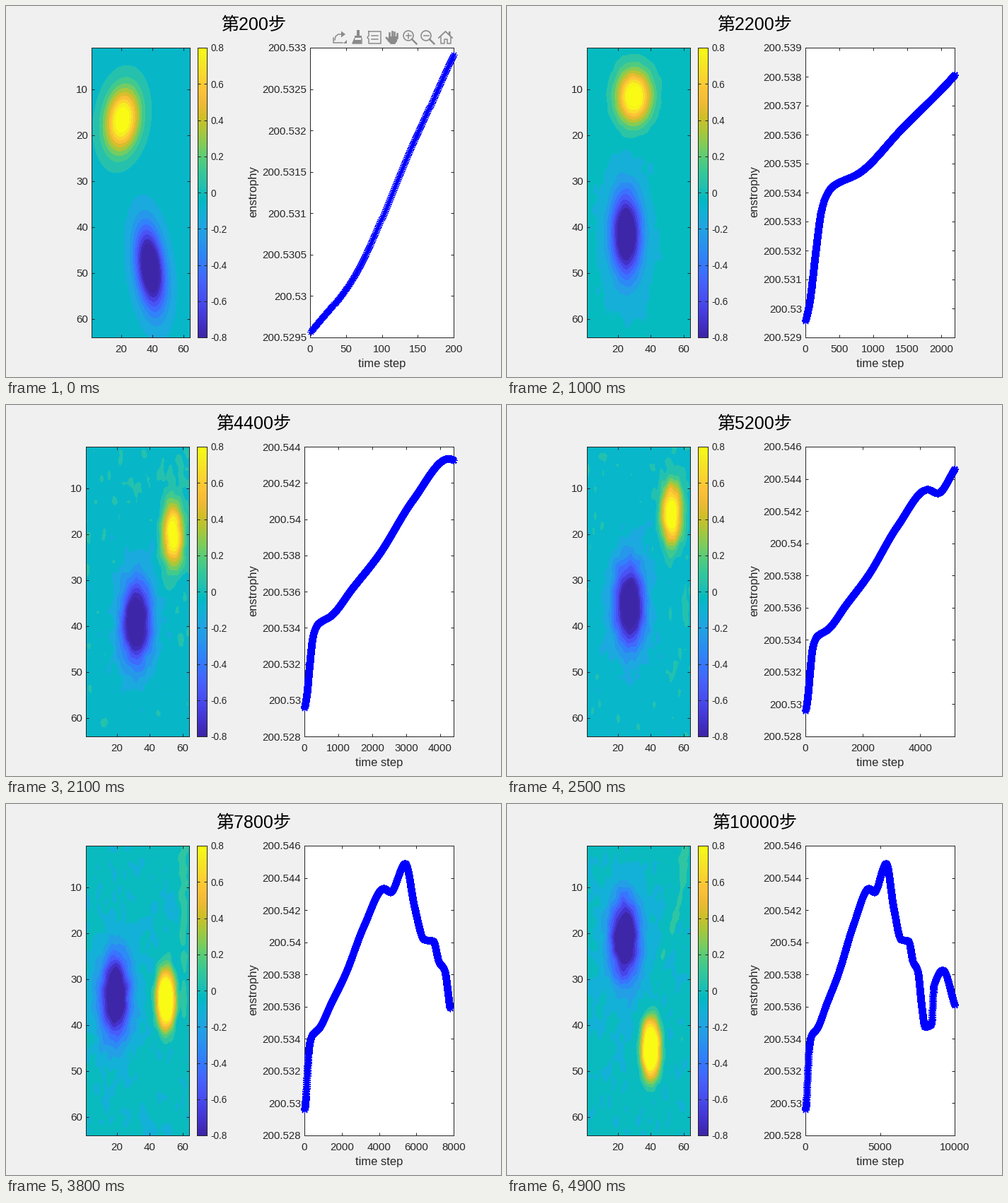
A matplotlib script that plays this animation: 700x525 px, repeating every 5000 ms.

```python
import numpy as np
import matplotlib.pyplot as plt
from matplotlib.animation import FuncAnimation
from matplotlib.colors import LinearSegmentedColormap, Normalize
from matplotlib.patches import Circle, Polygon

W, H, DPI = 700, 525, 100
FRAMES, INTERVAL, STRIDE = 50, 100, 200
PT = 72 / DPI
INK, ICON = "#262626", "#8a8a8a"
TOP, BOTTOM, RIGHT = 59, 469, 633

plt.rcParams["font.family"] = ["Liberation Sans", "Noto Sans CJK JP"]
plt.rcParams["axes.linewidth"] = PT

PARULA = LinearSegmentedColormap.from_list("warm_teal", [
    "#3e26a8", "#4332cb", "#4741e5", "#4852f4", "#4563fd", "#3875fe",
    "#2e87f7", "#2797eb", "#20a5e3", "#12b1d6", "#02bac3", "#24c1ae",
    "#37c897", "#57cc7a", "#81cc59", "#abc739", "#d1bf27", "#f0ba36",
    "#fec338", "#fad62d", "#f5e924", "#f9fb15"])
NORM = Normalize(-0.8, 0.8)

# Key points of the vortex paths, in pixels inside the field panel
PATH_STEPS = [200, 2200, 4400, 6200, 7800, 8600, 10000]
POSITIVE_PATH = [46 + 102j, 67 + 69j, 124 + 125j, 115 + 52j, 114 + 217j, 110 + 249j, 91 + 287j]
NEGATIVE_PATH = [88 + 312j, 56 + 264j, 72 + 248j, 44 + 199j, 42 + 213j, 36 + 142j, 54 + 132j]

# Turning points of the curve: step and (enstrophy - 200) * 1e5
ENSTROPHY = [
    (0, 52956), (60, 53022), (150, 53197), (230, 53335), (300, 53388),
    (400, 53422), (800, 53470), (1400, 53616), (2200, 53807), (3200, 54108),
    (4250, 54335), (4600, 54312), (5400, 54490), (5900, 54215), (6400, 54018),
    (6900, 54008), (7200, 53880), (7500, 53828), (7800, 53590), (8000, 53475),
    (8430, 53490), (8600, 53732), (9200, 53828), (10000, 53609)]

X, Y = np.meshgrid(np.linspace(0, 147, 64), np.linspace(0, 410, 64))
GRID = np.arange(1, 65)


def ease(t, start, end):
    u = np.clip((t - start) / (end - start), 0, 1)
    return u * u * (3 - 2 * u)


def glide(knots, values, t):
    """Smooth monotone interpolation through key points."""
    knots, values = np.asarray(knots, float), np.asarray(values, float)
    secant = np.diff(values) / np.diff(knots)
    a, b = secant[:-1], secant[1:]
    rising = a * b > 0
    inner = np.where(rising, 2 * a * b / np.where(rising, a + b, 1), 0)
    slope = np.concatenate([secant[:1], inner, secant[-1:]])
    i = np.clip(np.searchsorted(knots, t, "right") - 1, 0, len(knots) - 2)
    span = knots[i + 1] - knots[i]
    u = (t - knots[i]) / span
    return (values[i] + (values[i + 1] - values[i]) * u * u * (3 - 2 * u)
            + span * u * (1 - u) * (slope[i] * (1 - u) - slope[i + 1] * u))


def ripple_field(rng):
    z = rng.normal(size=(64, 64))
    for axis in (0, 1, 1):
        z = (np.roll(z, 1, axis) + 2 * z + np.roll(z, -1, axis)) / 4
    return z / z.std()


RNG = np.random.default_rng(7)
RIPPLES = [ripple_field(RNG) for _ in range(2)]


def radius(path, step, width, height, shear):
    cx = glide(PATH_STEPS, np.real(path), step)
    cy = glide(PATH_STEPS, np.imag(path), step)
    dy = Y - cy
    return np.hypot((X - cx - shear * dy) / width, dy / height)


def positive(step):
    """Shrinks, then steepens; squeezed flat near the top wall."""
    late = ease(step, 4000, 7000)
    cy = glide(PATH_STEPS, np.imag(POSITIVE_PATH), step)
    r = radius(POSITIVE_PATH, step, 24 - 10 * ease(step, 2200, 4400),
               44 - 11 * np.exp(-(cy / 85) ** 4), -0.12 * np.exp(-step / 800))
    return (1 + 0.1 * late) * np.exp(-r ** (2 + late))


def negative(step):
    r = radius(NEGATIVE_PATH, step, 21, 57, 0.14 * np.exp(-step / 800))
    return 1.05 * np.exp(-r**2) + 0.06 * np.exp(-(r / 2) ** 2)


def wall_trail(step):
    path = 139 - 70 * ease(step, 8600, 10000) * (Y / 240) ** 2
    length = 380 - 180 * ease(step, 6200, 8600)
    strength = 0.11 * ease(step, 4800, 6200)
    return strength * np.exp(-((X - path) / 5) ** 2 - (Y / length) ** 6)


def ripples(step):
    phase = step / 450
    mix = np.cos(phase) * RIPPLES[0] + np.sin(phase) * RIPPLES[1]
    return 0.026 * ease(step, 1000, 4000) * mix


def base_level(step):
    bump = np.exp(-((step - 2200) / 1200) ** 2)
    return -0.063 + 0.033 * bump + 0.04 * ease(step, 6400, 7400)


def nice_step(fits):
    return next(m * 10**e for e in range(6) for m in (1, 2, 5) if fits(m * 10**e))


def x_axis(step, width):
    limit = step if step < 7000 else 8000 if step <= 8000 else 10000
    gap = len(str(limit)) * 8.2 * 1.25
    return limit, nice_step(lambda s: s * width / limit >= gap)


def y_axis(low, high):
    def bounds(s):
        return np.floor(low / s) * s, np.ceil(high / s) * s

    s = nice_step(lambda s: (bounds(s)[1] - bounds(s)[0]) / s <= 10)
    return (*bounds(s), s)


fig = plt.figure(figsize=(W / DPI, H / DPI), dpi=DPI, facecolor="#f0f0f0")


def framed_axes(size):
    ax = fig.add_axes([0, 0, 1, 1], label=f"panel{len(fig.axes)}")
    ax.tick_params(direction="in", length=4 * PT, width=PT, color=INK,
                   labelcolor=INK, labelsize=size * PT, top=True, right=True)
    ax.tick_params(axis="x", pad=10 * PT)
    ax.tick_params(axis="y", pad=5 * PT)
    ax.spines[:].set_color(INK)
    return ax


def place(ax, left, right):
    ax.set_position([left / W, 1 - BOTTOM / H, (right - left) / W, (BOTTOM - TOP) / H])


field_ax = framed_axes(15)
field_ax.set(xlim=(1, 64), ylim=(64, 1), xticks=[20, 40, 60], yticks=range(10, 61, 10))

bar_ax = framed_axes(13.5)
bar_ax.imshow(np.linspace(-0.8, 0.8, 256)[:, None], cmap=PARULA, norm=NORM,
              origin="lower", extent=(0, 1, -0.8, 0.8), aspect="auto")
bar_ticks = np.arange(-4, 5) / 5
bar_ax.set_xticks([])
bar_ax.set_yticks(bar_ticks, [f"{v:g}" for v in bar_ticks])
bar_ax.yaxis.set_ticks_position("both")
bar_ax.tick_params(axis="y", labelleft=False, labelright=True)

plot_ax = framed_axes(15)
curve, = plot_ax.plot([], [], ls="none", marker=(8, 2, 0), ms=10 * PT, mew=PT,
                      color="#0000ff", clip_on=False, zorder=3)

overlay = fig.add_axes([0, 0, 1, 1], label="overlay")
overlay.set(xlim=(0, W), ylim=(H, 0))
overlay.axis("off")
title = overlay.text(350, 34, "", ha="center", va="baseline", size=25 * PT, color="black")
label_style = dict(ha="center", va="center", size=16.5 * PT, color=INK)
x_label = overlay.text(528, 507, "time step", **label_style)
overlay.text(350, 263, "enstrophy", rotation=90, **label_style)

toolbar = []


def stroke(*points, width=1.5):
    toolbar.extend(overlay.plot(*zip(*points), color=ICON, lw=width * PT))


def fill(*points):
    toolbar.append(overlay.add_patch(Polygon(points, color=ICON, lw=0)))


def magnifier(x, plus):
    toolbar.append(overlay.add_patch(
        Circle((x, 42), 7, fill=False, ec=ICON, lw=1.6 * PT)))
    stroke((x + 5, 47), (x + 11.5, 53.5), width=2.4)
    stroke((x - 3.5, 42), (x + 3.5, 42))
    if plus:
        stroke((x, 38.5), (x, 45.5))


def draw_toolbar():
    # export
    stroke((463, 45), (463, 52), (476, 52))
    stroke((465, 48), (466, 43), (470, 40), (476, 40))
    fill((474, 35.5), (480, 40), (474, 44.5))
    fill((482, 48), (482, 53), (477, 53))
    # brush
    stroke((498, 36), (498, 42), width=4)
    fill((493, 42), (503, 42), (503, 45), (493, 45))
    stroke((493, 46), (490, 53), (503, 53), (503, 46))
    fill((492, 48), (502, 48), (502, 53), (490, 53))
    # data tip
    stroke((513, 36), (530, 36), (530, 53), (513, 53), (513, 47), (511, 44.5),
           (513, 42), (513, 36))
    for y in (42, 47):
        stroke((517, y), (526, y))
    # hand
    fill((541, 43), (554, 43), (553, 50), (550, 54), (544, 54), (540, 49))
    for x, top in ((542, 38), (545.5, 36), (549, 36.5), (553, 39)):
        stroke((x, top), (x, 45), width=2.6)
    stroke((538, 45), (542, 50), width=2.6)
    magnifier(569, True)
    magnifier(594, False)
    # home
    stroke((612, 45), (621.5, 36), (631, 45), width=1.8)
    stroke((615, 44), (615, 53), (619.5, 53), (619.5, 47), (624, 47),
           (624, 53), (628.5, 53), (628.5, 44))
    fill((626, 36), (628.5, 36), (628.5, 42), (626, 40))


draw_toolbar()


def draw_field(step):
    for bands in list(field_ax.collections):
        bands.remove()
    z = positive(step) - negative(step) + wall_trail(step) + ripples(step)
    levels = base_level(step) + 0.1 * np.arange(-16, 18)
    field_ax.contourf(GRID, GRID, z, levels=levels, colors=PARULA(NORM(levels[:-1])))


def draw_curve(step):
    steps = np.linspace(1, step, min(step, 2500))
    values = glide(*zip(*ENSTROPHY), steps)
    curve.set_data(steps, values)
    low, high, dy = y_axis(values.min(), values.max())
    # Four-decimal labels push the panels to the right
    shift = 8 if dy < 100 else 0
    left = 422 + shift
    place(field_ax, 113 + shift, 259 + shift / 8)
    place(bar_ax, 270 + shift / 8, 284)
    place(plot_ax, left, RIGHT)
    x_label.set_x((left + RIGHT) / 2)
    limit, dx = x_axis(step, RIGHT - left)
    plot_ax.set_xticks(np.arange(0, limit + 1, dx))
    y_ticks = np.arange(low, high + 1, dy)
    plot_ax.set_yticks(y_ticks, [f"{200 + v / 1e5:.7g}" for v in y_ticks])
    plot_ax.set(xlim=(0, limit), ylim=(low, high))


def update(frame):
    step = STRIDE * (frame + 1)
    title.set_text(f"第{step}步")
    for artist in toolbar:
        artist.set_visible(frame == 0)
    draw_field(step)
    draw_curve(step)
    return []


anim = FuncAnimation(fig, update, frames=FRAMES, interval=INTERVAL,
                     init_func=lambda: [], repeat=True, repeat_delay=0, blit=False)
plt.show()
```
